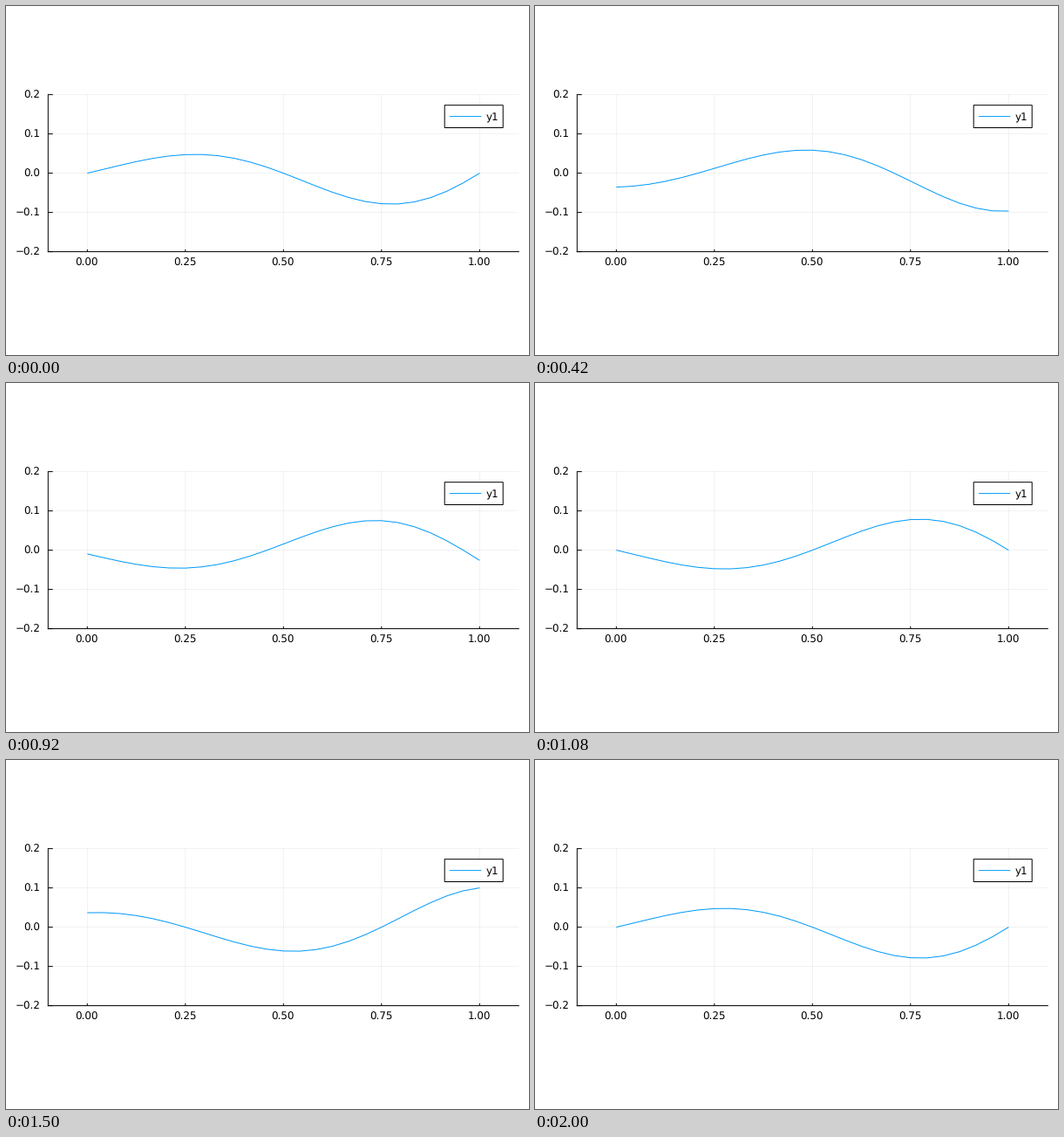
Animation of 600x400 px, one loop 2080 ms. Source, as a matplotlib script:

```python
import numpy as np
import matplotlib.pyplot as plt
from matplotlib.animation import FuncAnimation
from matplotlib.patches import Rectangle

W, H, DPI = 600, 400, 100
PX = 72 / DPI               # points per pixel
FRAMES, LOOP_MS = 25, 2080

X0, Y0, UNIT = 93.3, 191.6, 450   # pixel position of (0, 0), pixels per unit
BLUE = "#009AFA"

plt.rcParams.update({
    "font.family": "DejaVu Sans",
    "font.size": 11.85 * PX,
    "text.hinting": "none",
})


def sx(x):
    return X0 + UNIT * x


def sy(y):
    return Y0 - UNIT * y


fig = plt.figure(figsize=(W / DPI, H / DPI), dpi=DPI, facecolor="white")
ax = fig.add_axes([0, 0, 1, 1])
ax.set(xlim=(0, W), ylim=(H, 0))
ax.axis("off")


def line(xs, ys, color="black", width=1, **kw):
    return ax.plot(xs, ys, color=color, lw=width * PX, snap=False, **kw)[0]


def label(x, y, text, ha):
    ax.text(x, y, text, ha=ha, va="baseline", color="black")


left, right = sx(-0.1), sx(1.1)
top, bottom = sy(0.2), sy(-0.2)
grid = dict(width=0.5, alpha=0.1, solid_capstyle="butt")
tick = dict(solid_capstyle="butt")

for v in np.linspace(0, 1, 5):
    x = sx(v)
    line([x, x], [bottom, top], **grid)
    line([x, x], [bottom, bottom - 2.7], **tick)
    label(x - 0.8, 298, f"{v:.2f}", "center")

for n in range(-2, 3):
    y = sy(n / 10)
    line([left, right], [y, y], **grid)
    line([left, left + 5.4], [y, y], **tick)
    label(39.3, y + 4.3, f"{n / 10:.1f}".replace("-", "\u2212"), "right")

line([left, right], [bottom, bottom])
line([left, left], [bottom, top])

# Travelling wave whose amplitude grows along x
xs = np.linspace(0, 1, 25)
wave = line(sx(xs), sy(0 * xs), BLUE, solid_capstyle="butt")

# Legend
ax.add_patch(Rectangle((503.2, 113.7), 67, 25.8, fc="white", ec="black",
                       lw=PX, snap=False, zorder=3))
line([509, 545.3], [126.6, 126.6], BLUE, solid_capstyle="butt", zorder=4)
ax.text(551, 131, "y1", color="black", zorder=4)


def update(i):
    t = i / (FRAMES - 1)
    wave.set_ydata(sy(0.1 * np.exp(xs - 1) * np.sin(2 * np.pi * (xs - t))))
    return (wave,)


anim = FuncAnimation(fig, update, frames=FRAMES, interval=LOOP_MS / FRAMES,
                     repeat=True, repeat_delay=0)
plt.show()
```
